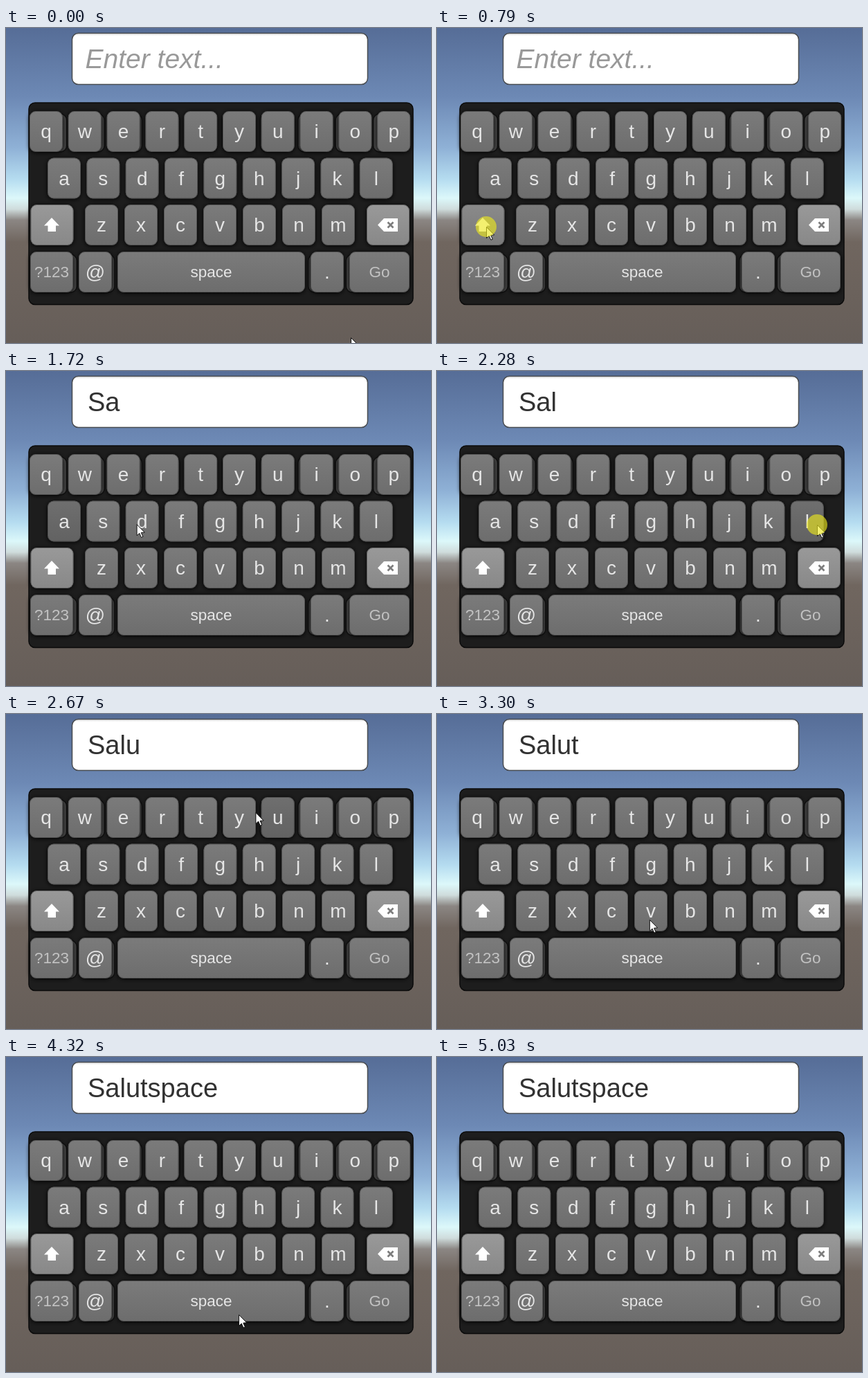
These frames come from a looping animation (614 px wide and 455 px high, 5.27 s). An HTML page with a canvas:

```html
<!DOCTYPE html>
<html lang="en">
<head>
<meta charset="utf-8">
<title>On-screen keyboard</title>
<style>
  html, body { margin: 0; width: 614px; height: 455px; overflow: hidden; }
  canvas { display: block; }
</style>
</head>
<body>
<canvas id="stage" width="614" height="455"></canvas>
<script>
const ctx = document.getElementById('stage').getContext('2d');
const LOOP = 5270, STEP = 78.6, LAST = 64, KEY_H = 59;
const FONT = '"Liberation Sans", Arial, sans-serif';

// The pointer eases from stop to stop and clicks the named key just before it leaves
const stop = (x, y, arrive, leave, label) =>
  ({ x, y, arrive, leave, label, done: Math.floor(leave) });
const stops = [
  stop(498, 447, 0, 0),
  stop(71, 287, 7, 11, 'shift'),
  stop(146, 228, 14, 16, 's'),
  stop(92, 221, 18, 21.2, 'a'),
  stop(549, 222, 23.9, 29.3, 'l'),
  stop(395, 142, 32, 33, 'u'),
  stop(303, 142, 35.4, 38, 't'),
  stop(308, 343, 43.8, 46, 'space'),
  stop(308, 343, 50, 50),
  stop(343, 379, 57, 57),
  stop(502, 457, 64, 65)
];
const clicks = stops.filter(s => s.label);

const keys = [];
function addRow(labels, x, y, pitch) {
  [...labels].forEach((label, i) => keys.push({ label, x: x + i * pitch, y, w: 48, size: 28 }));
}
addRow('qwertyuiop', 34, 120, 55.8);
addRow('asdfghjkl', 60, 187.5, 56.35);
addRow('zxcvbnm', 114, 255, 57);
keys.push(
  { label: 'shift', x: 35.5, y: 255, w: 62, icon: arrow },
  { label: 'back', x: 521, y: 255, w: 62, icon: eraser },
  { label: '?123', x: 35, y: 323, w: 62, size: 22.5, dim: true },
  { label: '@', x: 105, y: 323, w: 48, size: 28 },
  { label: 'space', x: 161, y: 323, w: 271, size: 22.5 },
  { label: '.', x: 440, y: 323, w: 48, size: 28 },
  { label: 'Go', x: 496, y: 323, w: 87, size: 22.5, dim: true }
);

function box(x, y, w, h, r, fill, line, width = 1) {
  ctx.beginPath();
  ctx.roundRect(x, y, w, h, r);
  if (fill) {
    ctx.fillStyle = fill;
    ctx.fill();
  }
  if (line) {
    ctx.strokeStyle = line;
    ctx.lineWidth = width;
    ctx.stroke();
  }
}

function poly(points, fill) {
  ctx.beginPath();
  points.forEach(([x, y]) => ctx.lineTo(x, y));
  ctx.closePath();
  ctx.fillStyle = fill;
  ctx.fill();
}

function gradient(y0, y1, stops) {
  const g = ctx.createLinearGradient(0, y0, 0, y1);
  stops.forEach(([p, c]) => g.addColorStop(p, c));
  return g;
}

function text(s, x, y, size, color, align = 'center', style = '') {
  ctx.font = `${style} ${size}px ${FONT}`;
  ctx.textAlign = align;
  ctx.fillStyle = color;
  ctx.fillText(s, x, y);
}

function arrow() {
  poly([[66, 274], [77, 285.5], [72, 285.5], [72, 294], [60.5, 294], [60.5, 285.5], [55, 285.5]], '#fff');
}

function eraser() {
  poly([[537, 284.5], [546, 275], [566, 275], [566, 294], [546, 294]], '#fff');
  ctx.beginPath();
  for (const d of [-4, 4]) {
    ctx.moveTo(555.5 - d, 280.5);
    ctx.lineTo(555.5 + d, 288.5);
  }
  ctx.strokeStyle = '#7c7c7c';
  ctx.lineWidth = 2.6;
  ctx.stroke();
}

function drawBackground() {
  ctx.fillStyle = gradient(0, 455, [
    [0, '#566d97'], [.22, '#6d89b5'], [.38, '#8fb1d6'], [.48, '#b5dcf0'], [.54, '#dcf8fa'],
    [.575, '#cfdcdc'], [.61, '#8b8683'], [.68, '#70665f'], [1, '#665e59']
  ]);
  ctx.fillRect(0, 0, 614, 455);
}

function drawField(value) {
  const fill = gradient(7, 82, [[0, '#d8d8d8'], [.06, '#fff'], [1, '#fff']]);
  box(95.5, 7.5, 427, 74, 9, fill, '#494c50', 1.5);
  if (value) text(value, 118, 58, 38, '#323232', 'left');
  else text('Enter text...', 114.5, 58, 39, '#999', 'left', 'italic');
}

// Slightly narrower row peeking out behind the keys
function drawGhost({ x, y, w }) {
  const s = .975;
  box(309 + (x - 309) * s, y + 4, w * s, KEY_H - 4, 9, '#4a4a4a', '#111', 1.5);
}

function drawKey(key, upper, pressed) {
  const { x, y, w, label, size, dim, icon } = key;
  const [top, bottom] = icon ? ['#999', '#888'] : ['#7b7b7b', '#6d6d6d'];
  ctx.save();
  ctx.shadowColor = '#000';
  ctx.shadowBlur = 6;
  ctx.shadowOffsetY = 1;
  box(x, y, w, KEY_H, 9, gradient(y, y + KEY_H, [[0, top], [1, bottom]]));
  ctx.restore();
  box(x + .5, y + .5, w - 1, KEY_H - 1, 8.5, pressed && 'rgba(0,0,0,.1)', 'rgba(50,50,50,.5)');
  if (icon) return icon();
  const s = upper && !dim ? label.toUpperCase() : label;
  text(s, x + w / 2, y + (size > 25 ? 39 : 37), size, dim ? '#c2c2c2' : '#e6e6e6');
}

function drawPointer({ x, y }, pressed) {
  ctx.save();
  ctx.translate(x + .5, y + .5);
  poly([[0, 0], [0, 16], [3.7, 12.6], [6.4, 18.7], [8.8, 17.6], [6.2, 11.8], [11.2, 11.4]], '#fff');
  ctx.strokeStyle = '#111';
  ctx.lineWidth = 1;
  ctx.stroke();
  ctx.restore();
  if (pressed) {
    ctx.beginPath();
    ctx.arc(x, y, 15, 0, 7);
    ctx.fillStyle = 'rgba(236,232,30,.64)';
    ctx.fill();
  }
}

function pointerAt(k) {
  const i = stops.findIndex(s => k <= s.leave);
  const to = stops[i], from = stops[i - 1];
  if (!from || k >= to.arrive) return to;
  const t = (k - from.leave) / (to.arrive - from.leave);
  const e = t * t * (3 - 2 * t);
  return { x: from.x + (to.x - from.x) * e, y: from.y + (to.y - from.y) * e };
}

function draw(time) {
  const k = Math.min(LAST, Math.floor((time % LOOP + 10) / STEP));
  const [shift, ...letters] = clicks;
  const upper = k >= shift.done && k <= letters[0].done;
  const typed = letters.filter(c => k >= c.done).map(c => c.label).join('');
  const active = clicks.find(c => k >= c.done - 1 && k <= c.done + 1);

  drawBackground();
  drawField(typed.charAt(0).toUpperCase() + typed.slice(1));
  box(33, 108, 555, 291.5, 9, '#1d1d1d', '#0b0b0b', 1.5);
  keys.filter(key => key.y === 120 || key.y === 323).forEach(drawGhost);
  keys.forEach(key => drawKey(key, upper, active && active.label === key.label));
  drawPointer(pointerAt(k), active && k <= active.done);
}

function tick() {
  draw(performance.now());
  requestAnimationFrame(tick);
}
tick();
</script>
</body>
</html>
```
